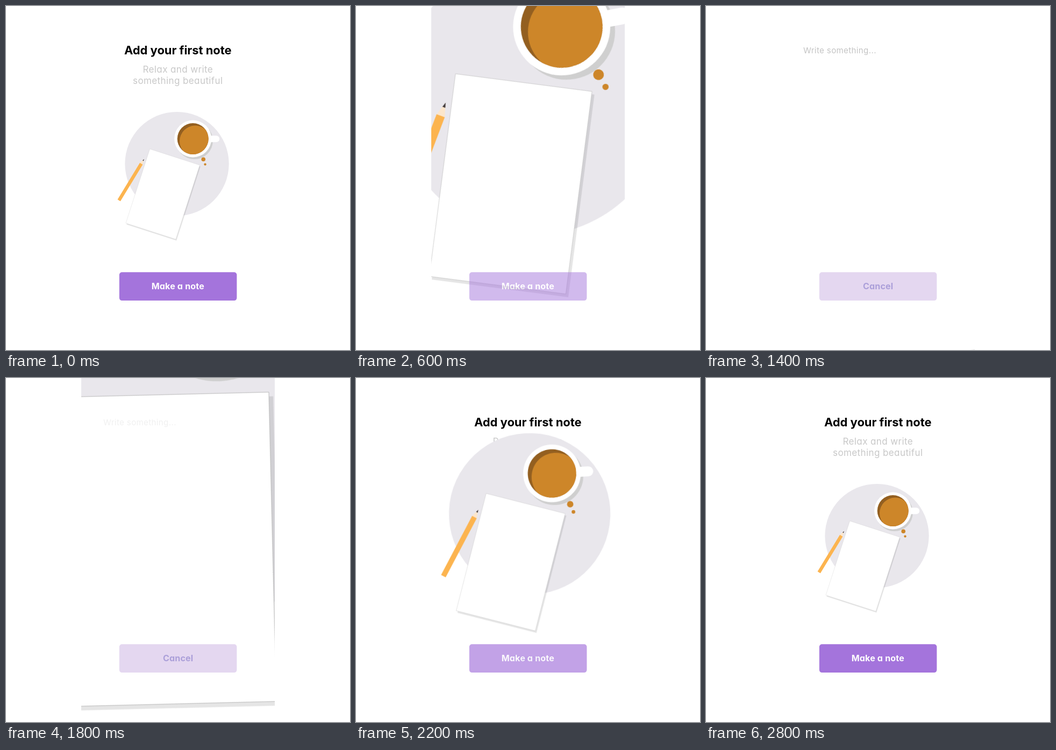
An HTML page that plays this animation: 640 px wide and 640 px high, repeating every 3900 ms.

```html
<!DOCTYPE html>
<html lang="en">
<head>
<meta charset="utf-8">
<title>First note</title>
<style>
  html, body { margin: 0; width: 100%; height: 100%; overflow: hidden; background: #fff; }
  svg { display: block; width: 100%; height: 100%; }
  text {
    font-family: Inter, "Open Sans", sans-serif;
    font-feature-settings: "cv11";
    text-anchor: middle;
  }
  .title { font-size: 21.9px; font-weight: 700; }
  .sub { font-size: 17px; letter-spacing: .4px; fill: #c8c8c8; }
  .hint { font-size: 15px; letter-spacing: .4px; fill: #c4c4c4; text-anchor: start; }
  .label { font-size: 16px; font-weight: 700; letter-spacing: .2px; }

  .art, .hint, .make, .cancel { animation: 3900ms linear infinite; }
  .art { animation-name: zoom; transform-origin: 311.2px 315.5px; }
  .hint { animation-name: hint; }
  .make { animation-name: make; }
  .cancel { animation-name: cancel; }

  @keyframes zoom {
    0%, 69.59%, 100% { transform: translate(0px, 0px) rotate(0deg) scale(1); }
    1.154% {
      transform: translate(0px, 0px) rotate(0deg) scale(1);
      animation-timing-function: cubic-bezier(.81, 0, .4, 1);
    }
    26.795% { transform: translate(24px, -194px) rotate(-24.7deg) scale(4.8); }
    38.692% {
      transform: translate(24px, -194px) rotate(-24.7deg) scale(4.8);
      animation-timing-function: cubic-bezier(.4, 0, .2, 1);
    }
  }
  @keyframes hint {
    0%, 17.44% { opacity: 0; }
    28.2%, 38.692% { opacity: 1; }
    48.72%, 100% { opacity: 0; }
  }
  @keyframes make {
    0%, 11.54% { opacity: 1; }
    19.23%, 50% { opacity: 0; }
    60.26%, 100% { opacity: 1; }
  }
  @keyframes cancel {
    0%, 20.51% { opacity: 0; }
    28.2%, 35.89% { opacity: .97; }
    35.897%, 48.72% { opacity: 1; }
    60.26%, 100% { opacity: 0; }
  }
</style>
</head>
<body>
<svg viewBox="0 0 640 640">
  <defs>
    <clipPath id="screen"><rect x="140" width="360" height="640"/></clipPath>
    <clipPath id="brim"><circle cx="347.7" cy="247" r="29"/></clipPath>
  </defs>

  <text class="title" x="319.8" y="90">Add your first note</text>
  <text class="sub" x="319.8" y="123.5">Relax and write</text>
  <text class="sub" x="319.8" y="145">something beautiful</text>

  <g clip-path="url(#screen)">
    <g class="art">
      <circle cx="318" cy="293.6" r="96.7" fill="#e9e7ec"/>

      <!-- cup -->
      <circle cx="350.5" cy="250.6" r="34.5" fill="#cfcfcf"/>
      <rect x="370" y="241.3" width="27.2" height="11.9" rx="5.95" fill="#fff"/>
      <circle cx="347.7" cy="247" r="34.5" fill="#fff"/>
      <circle cx="347.7" cy="247" r="29" fill="#935f20"/>
      <g clip-path="url(#brim)">
        <circle cx="352" cy="251.5" r="29" fill="#cd8629"/>
      </g>
      <g fill="#cd8629">
        <circle cx="367.2" cy="285.2" r="3.8"/>
        <circle cx="370.5" cy="294.6" r="2.2"/>
      </g>

      <!-- paper -->
      <g transform="translate(291.7 350) rotate(17.9)">
        <rect x="-46.85" y="-70.5" width="97.7" height="145" opacity=".1"/>
        <rect x="-48.85" y="-72.5" width="97.7" height="145" fill="#fff" stroke="#b4b4b4" stroke-width=".22"/>
      </g>

      <!-- pencil -->
      <g transform="translate(256.9 284.8) rotate(31.3)">
        <path d="M0 0L3.1 10.1H-3.1Z" fill="#fce6cb"/>
        <path d="M0 0L1.1 3.6H-1.1Z" fill="#403a3c"/>
        <rect x="-3.1" y="10" width="6.2" height="80" fill="#fcb44f"/>
      </g>
    </g>
  </g>

  <text class="hint" x="181" y="87.5">Write something...</text>

  <g class="cancel">
    <rect x="210.8" y="495.3" width="218.6" height="52.8" rx="5" fill="#e4d7f0"/>
    <text class="label" x="320.2" y="527.4" fill="#ab9fd9">Cancel</text>
  </g>
  <g class="make">
    <rect x="210.8" y="495.3" width="218.6" height="52.8" rx="5" fill="#a474dc"/>
    <text class="label" x="319.8" y="527.4" fill="#fff">Make a note</text>
  </g>
</svg>
</body>
</html>
```
